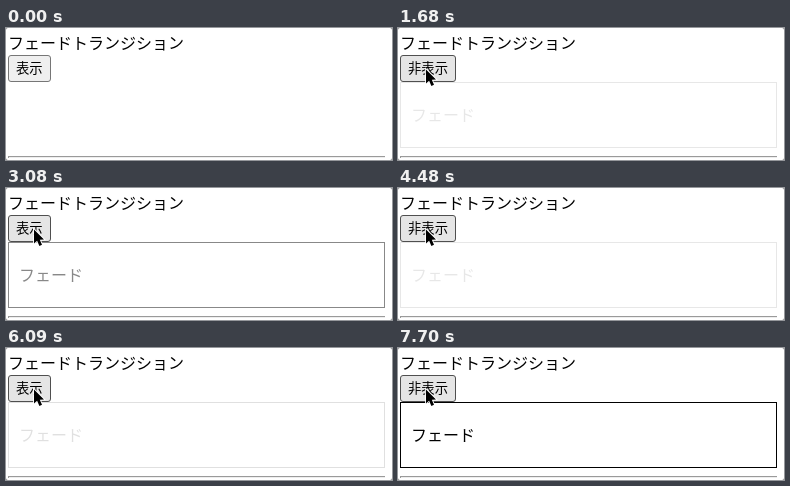
An HTML page with a canvas that plays this animation: 386 by 132 pixels, repeating every 8050 ms.

```html
<!DOCTYPE html>
<html lang="ja">
<head>
<meta charset="utf-8">
<title>フェードトランジション</title>
<style>
  html, body { margin: 0; width: 100%; height: 100%; overflow: hidden; background: #fff; }
  canvas { display: block; }
</style>
</head>
<body>
<canvas id="stage" width="386" height="132"></canvas>
<script>
const ctx = document.getElementById('stage').getContext('2d');
const FONT = '"Noto Sans CJK JP", "Noto Sans CJK", "Noto Sans", sans-serif';
const LOOP = 8050, STEP = 70, FADE = 500;

// ring: pointer pressed, press: button active, toggle: label swap, fade: transition start
const clicks = [
  { ring: 1540, press: 1540, toggle: 1680, fade: 1630 },
  { ring: 2800, press: 2800, toggle: 2940, fade: 2925 },
  { ring: 4270, press: 4340, toggle: 4480, fade: 4430 },
  { ring: 5740, press: 5740, toggle: 5810, fade: 5795 },
  { ring: 7140, press: 7140, toggle: 7280, fade: 7230 }
];

// CSS "ease": cubic-bezier(.25, .1, .25, 1)
function ease(x) {
  if (x <= 0) return 0;
  if (x >= 1) return 1;
  const bezier = (s, a, b) => 3 * s * (1 - s) ** 2 * a + 3 * s * s * (1 - s) * b + s ** 3;
  let lo = 0, hi = 1;
  for (let i = 0; i < 24; i++) {
    const mid = (lo + hi) / 2;
    if (bezier(mid, .25, .25) < x) lo = mid; else hi = mid;
  }
  return bezier(lo, .1, 1);
}

function text(str, x, y, size) {
  ctx.fillStyle = '#000';
  ctx.font = `${size}px ${FONT}`;
  ctx.fillText(str, x, y);
}

function drawPage() {
  ctx.fillStyle = '#777';
  ctx.fillRect(0, 0, 386, 132);
  ctx.fillStyle = '#fff';
  ctx.beginPath();
  ctx.roundRect(0, 0, 386, 132, 2);
  ctx.fill();
  text('フェードトランジション', 2, 21, 16);
  ctx.fillStyle = '#9a9a9a';
  ctx.fillRect(2, 128, 377, 1);
  ctx.fillRect(2, 129, 1, 1);
  ctx.fillStyle = '#eee';
  ctx.fillRect(3, 129, 376, 1);
}

function drawButton(shown, hover, active) {
  const [fill, line] = active ? ['#f5f5f5', '#8d8d8d']
    : hover ? ['#e5e5e5', '#4f4f4f'] : ['#efefef', '#767676'];
  ctx.beginPath();
  ctx.roundRect(2.5, 27.5, shown ? 55 : 42, 26, 2.5);
  ctx.fillStyle = fill;
  ctx.fill();
  ctx.strokeStyle = line;
  ctx.lineWidth = 1;
  ctx.stroke();
  text(shown ? '非表示' : '表示', 10, 45, 13.333);
}

function drawPanel(alpha) {
  ctx.globalAlpha = alpha;
  ctx.strokeStyle = '#000';
  ctx.lineWidth = 1;
  ctx.strokeRect(2.5, 54.5, 376, 65);
  text('フェード', 13, 93, 16);
  ctx.globalAlpha = 1;
}

function pointerAt(t) {
  if (t < 770) {
    const rest = (1 - (t - 70) / 700) ** 2;
    return [28 + 127.5 * rest, 35.5 + 62.5 * rest];
  }
  return [28, t < 840 ? 35.5 : t < 1260 ? 37.5 : t < 1400 ? 40.5 : 41.5];
}

function drawPointer([x, y], pressed) {
  if (pressed) {
    ctx.beginPath();
    ctx.arc(x, y + .2, 20.4, 0, 2 * Math.PI);
    ctx.strokeStyle = '#000';
    ctx.lineWidth = 3;
    ctx.stroke();
  }
  const arrow = [[0, 0], [0, 14], [3.1, 11.2], [5.4, 16.4], [8, 15.3], [5.8, 10.2], [10, 9.9]];
  ctx.beginPath();
  for (const [dx, dy] of arrow) ctx.lineTo(x + dx, y + dy);
  ctx.closePath();
  ctx.lineJoin = 'miter';
  ctx.strokeStyle = '#fff';
  ctx.lineWidth = 1.8;
  ctx.stroke();
  ctx.fillStyle = '#000';
  ctx.fill();
}

function panelAlpha(t, count) {
  if (!count) return 0;
  const p = ease((t - clicks[count - 1].fade) / FADE);
  if (count % 2) return p > .985 ? 1 : p;
  return p > .92 ? 0 : 1 - p;
}

function draw(t) {
  const count = clicks.filter(c => t >= c.toggle).length;
  const next = clicks[count];
  const focusClick = t >= 770 && t < 910;
  const alpha = panelAlpha(t, count);
  drawPage();
  drawButton(count % 2 === 1, t >= 1260, next && t >= next.press);
  if (alpha > 0) drawPanel(alpha);
  if (t >= 70) drawPointer(pointerAt(t), focusClick || (next && t >= next.ring));
}

const start = performance.now();
function tick() {
  const t = (performance.now() - start) % LOOP;
  draw(Math.floor(t / STEP) * STEP);
  requestAnimationFrame(tick);
}
tick();
</script>
</body>
</html>
```
